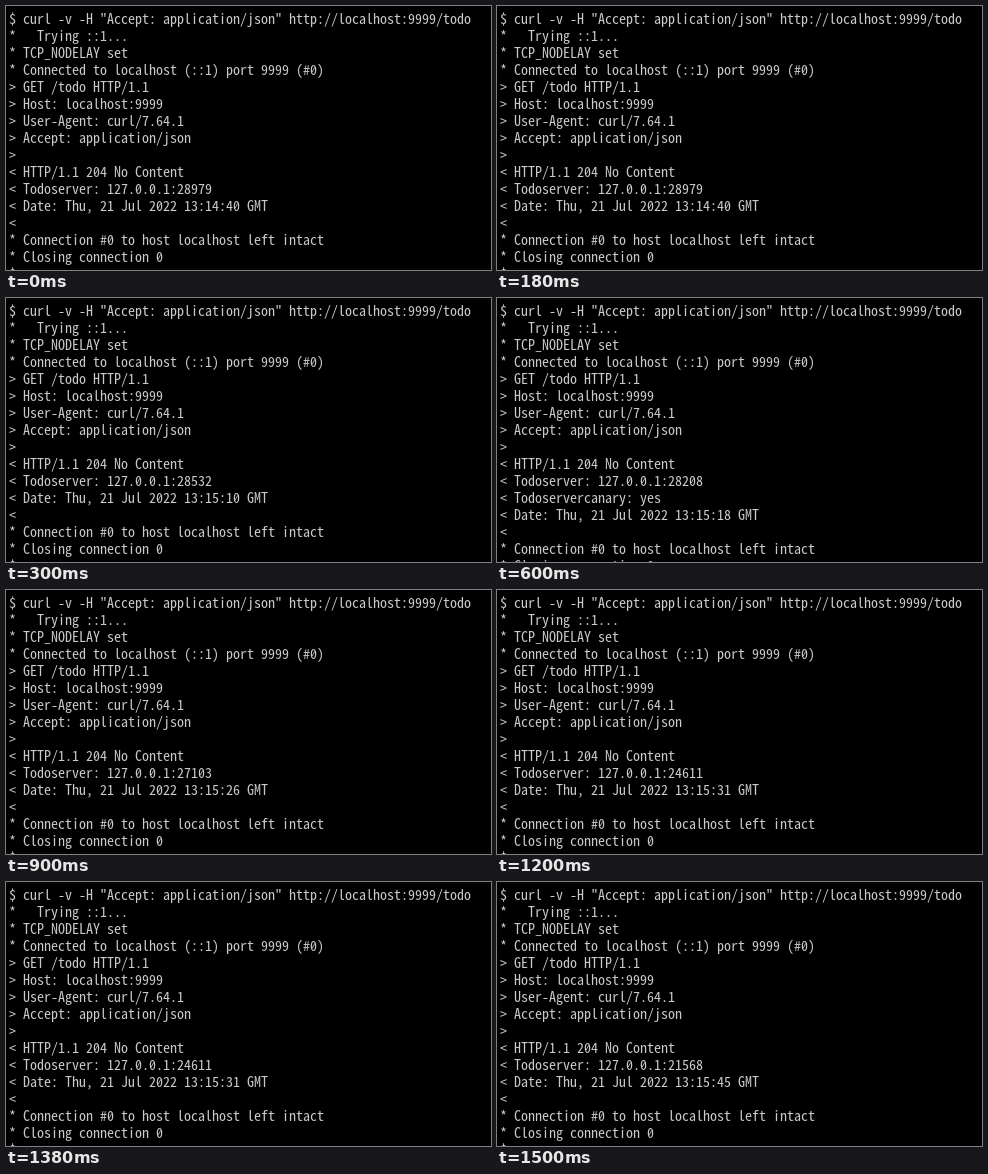
Write an HTML page that moves like this. It is 485x264 px and loops after 1.8 s.

```html
<!DOCTYPE html>
<html lang="en">
<head>
<meta charset="utf-8">
<title>curl responses</title>
<style>
  html, body { margin: 0; width: 100%; height: 100%; overflow: hidden; background: #000; }
  svg { display: block; width: 485px; height: 264px; background: #000; }
  text {
    font: 14px "Noto Sans Mono CJK JP", "Noto Sans Mono CJK SC", "Noto Sans Mono", monospace;
    font-variant-ligatures: none;
    font-kerning: none;
    fill: #cacaca;
    white-space: pre;
  }
  path { fill: none; stroke: #cacaca; stroke-width: 0.9; }
</style>
</head>
<body>
<svg id="terminal" viewBox="0 0 485 264"></svg>
<script>
const STEP = 300;
const CELL_WIDTH = 7;
const LINE_HEIGHT = 17;
const FIRST_BASELINE = 18;
const LEFT = 3;

const responses = [
  { port: 28979, time: "13:14:40" },
  { port: 28532, time: "13:15:10" },
  { port: 28208, time: "13:15:18", canary: true },
  { port: 27103, time: "13:15:26" },
  { port: 24611, time: "13:15:31" },
  { port: 21568, time: "13:15:45" },
];

const transcript = ({ port, time, canary }) => [
  '$ curl -v -H "Accept: application/json" http://localhost:9999/todo',
  "*   Trying ::1...",
  "* TCP_NODELAY set",
  "* Connected to localhost (::1) port 9999 (#0)",
  "> GET /todo HTTP/1.1",
  "> Host: localhost:9999",
  "> User-Agent: curl/7.64.1",
  "> Accept: application/json",
  ">",
  "< HTTP/1.1 204 No Content",
  `< Todoserver: 127.0.0.1:${port}`,
  ...(canary ? ["< Todoservercanary: yes"] : []),
  `< Date: Thu, 21 Jul 2022 ${time} GMT`,
  "<",
  "* Connection #0 to host localhost left intact",
  "* Closing connection 0",
  "$",
];

const terminal = document.getElementById("terminal");
const add = name => terminal.appendChild(document.createElementNS("http://www.w3.org/2000/svg", name));
const baseline = row => FIRST_BASELINE + row * LINE_HEIGHT;

const rows = Array.from({ length: 16 }, (_, i) => {
  const row = add("text");
  row.setAttribute("x", LEFT);
  row.setAttribute("y", baseline(i));
  return row;
});
const zeroSlashes = add("path");

// Terminal zeros carry a diagonal stroke inside the bowl.
const slashZeros = (line, row) =>
  [...line.matchAll(/0/g)]
    .map(({ index }) => `M${LEFT + index * CELL_WIDTH + 2.2} ${baseline(row) - 3}l2.6 -4.6`)
    .join("");

let shown = -1;

function render(ms) {
  const index = Math.floor(ms / STEP) % responses.length;
  if (index === shown) return;
  shown = index;
  const lines = transcript(responses[index]);
  rows.forEach((row, i) => { row.textContent = lines[i]; });
  zeroSlashes.setAttribute("d", lines.map(slashZeros).join(""));
}

const start = performance.now();

function tick() {
  render(performance.now() - start);
  requestAnimationFrame(tick);
}

tick();
</script>
</body>
</html>
```
